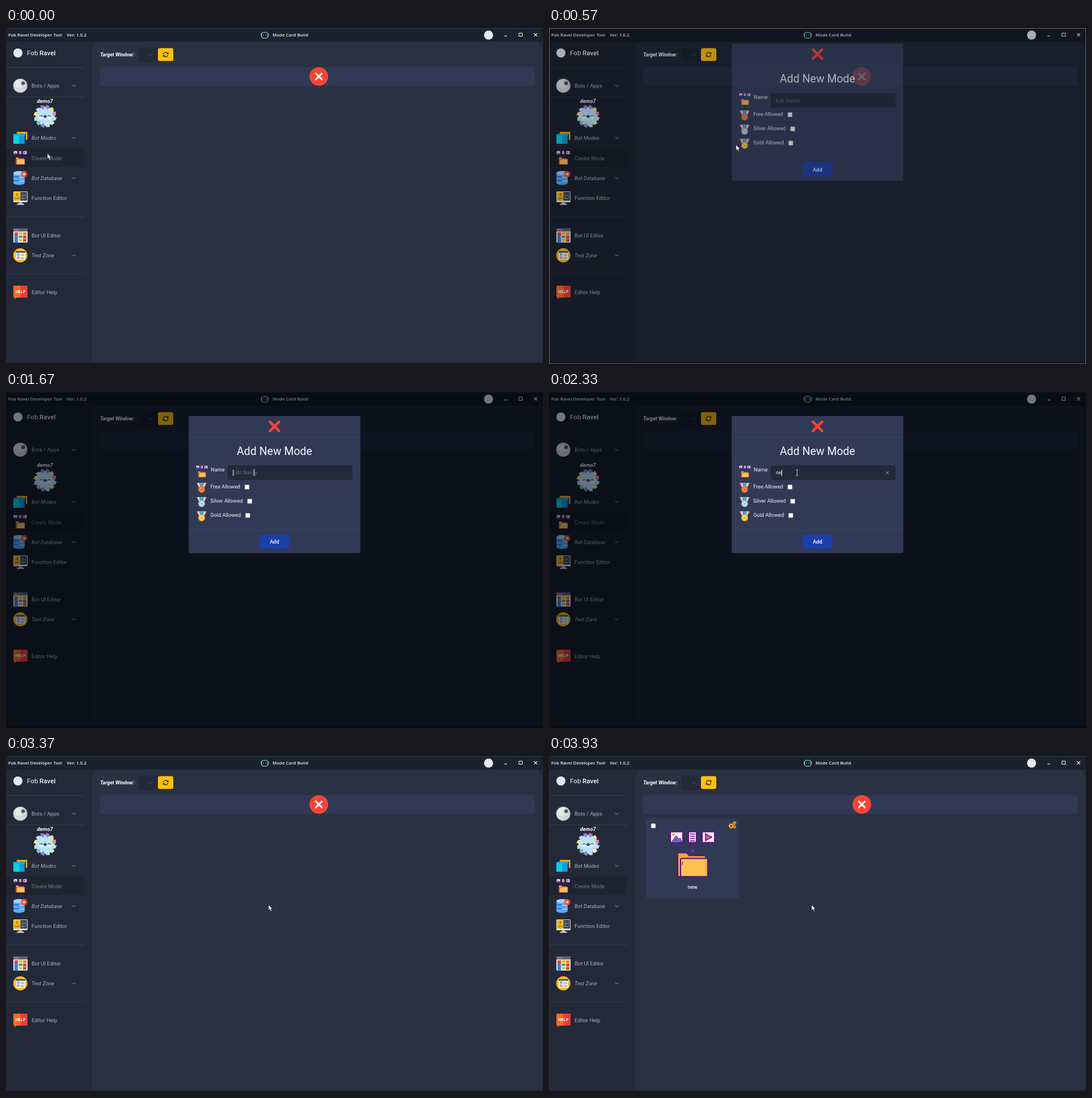
An HTML page with a canvas that plays this animation: 947 px wide and 592 px high, repeating every 4410 ms.

```html
<!DOCTYPE html>
<html lang="en">
<head>
<meta charset="utf-8">
<title>Mode Card Build</title>
<style>
html, body { margin: 0; width: 100%; height: 100%; overflow: hidden; background: #24293a; }
canvas { display: block; width: 947px; height: 592px; }
</style>
</head>
<body>
<canvas id="stage"></canvas>
<script>
const W = 947, H = 592, LOOP = 4410;
const dpr = window.devicePixelRatio || 1;
const stage = document.getElementById('stage');
const spare = document.createElement('canvas');
for (const c of [stage, spare]) { c.width = W * dpr; c.height = H * dpr; }
const main = stage.getContext('2d');
const off = spare.getContext('2d');
let g = main;

const clamp = v => Math.max(0, Math.min(1, v));
const span = (t, a, b) => clamp((t - a) / (b - a));
const easeOut = p => 1 - Math.pow(1 - p, 1.75);

// Shape helpers
function rect(x, y, w, h, fill, r = 0, line, lw = 1) {
  g.beginPath();
  g.roundRect(x, y, w, h, r);
  if (fill) { g.fillStyle = fill; g.fill(); }
  if (line) { g.strokeStyle = line; g.lineWidth = lw; g.stroke(); }
}
function disc(x, y, r, fill, ry = r) {
  g.beginPath();
  g.ellipse(x, y, r, ry, 0, 0, 7);
  g.fillStyle = fill;
  g.fill();
}
function trace(pts, close) {
  g.beginPath();
  for (let i = 0; i < pts.length; i += 2) g.lineTo(pts[i], pts[i + 1]);
  if (close) g.closePath();
}
function poly(pts, fill, line, lw = 1) {
  trace(pts, true);
  g.fillStyle = fill;
  g.fill();
  if (line) { g.strokeStyle = line; g.lineWidth = lw; g.stroke(); }
}
function stroke(pts, color, lw = 1) {
  trace(pts);
  g.strokeStyle = color;
  g.lineWidth = lw;
  g.stroke();
}
function arc(x, y, r, a, b, color, lw = 1) {
  g.beginPath();
  g.arc(x, y, r, a, b);
  g.strokeStyle = color;
  g.lineWidth = lw;
  g.stroke();
}
function cross(x, y, r, color, lw) {
  stroke([x - r, y - r, x + r, y + r], color, lw);
  stroke([x + r, y - r, x - r, y + r], color, lw);
}
function text(s, x, y, color, font = '9.3px', align = 'left', family = 'Roboto') {
  g.font = `${font} ${family}, sans-serif`;
  g.textAlign = align;
  g.textBaseline = 'alphabetic';
  g.fillStyle = color;
  g.fillText(s, x, y);
}
function at(x, y, scale, fn) {
  g.save();
  g.translate(x, y);
  g.scale(scale, scale);
  fn();
  g.restore();
}
// Draws a group with one common opacity
function layer(alpha, dy, fn) {
  if (alpha <= 0) return;
  off.setTransform(1, 0, 0, 1, 0, 0);
  off.clearRect(0, 0, spare.width, spare.height);
  off.setTransform(dpr, 0, 0, dpr, 0, dy * dpr);
  g = off;
  fn();
  g = main;
  g.globalAlpha = alpha;
  g.drawImage(spare, 0, 0, W, H);
  g.globalAlpha = 1;
}
function gear(x, y, r, color, hole) {
  g.save();
  g.translate(x, y);
  for (let i = 0; i < 4; i++) {
    rect(-r, -r * .24, r * 2, r * .48, color);
    g.rotate(Math.PI / 4);
  }
  g.restore();
  disc(x, y, r * .76, color);
  disc(x, y, r * .36, hole);
}
const chevron = (x, y, c = '#a0a7b5') => stroke([x - 3, y - 1.5, x, y + 1.5, x + 3, y - 1.5], c, 1);

// Folder with three files, 80 units wide
function folderIcon() {
  const ink = '#56107e';
  stroke([12, 22, 12, 28, 68, 28, 68, 22], '#4a2671', 1.5);
  stroke([40, 22, 40, 33], '#4a2671', 1.5);
  poly([36.5, 33, 43.5, 33, 40, 38], '#7a2fb5');
  for (const [x, w] of [[1, 22], [33, 14], [57, 22]]) rect(x, 1, w, 19, '#faf0fb', 1, ink, 2);
  poly([3, 20, 11, 8, 16, 14, 18, 12, 22, 20], '#5d6bc0', ink);
  disc(6.5, 6, 2.3, '#f6a33a');
  for (let y = 5; y < 18; y += 4) stroke([35.5, y, 44.5, y], ink, 1.6);
  poly([63, 4.5, 63, 16.5, 74, 10.5], '#f0529c', ink, 1.5);
  poly([14, 80, 14, 38, 30, 38, 34, 43, 63, 43, 63, 80], '#f7a537', ink, 2);
  rect(19, 48, 48, 32, '#ffc250', 2, ink, 2);
  rect(63, 49, 3, 30, '#f7a537');
  stroke([22, 54, 22, 59], ink, 1.4);
}

function avatar() {
  const tips = ['#9a7fd0', '#f5e58a', '#e58a98', '#b5e0f8', '#f5e58a', '#b5e0f8',
    '#9a7fd0', '#7fc3a6', '#b5e0f8', '#f5e58a', '#b5e0f8', '#9a7fd0'];
  at(69, 155.5, 1, () => {
    tips.forEach((c, i) => {
      g.save();
      g.rotate((i + .5) * Math.PI / 6);
      poly([-4.5, -11, -3, -20.5, 3, -19, 4.5, -11], c);
      g.restore();
    });
    const star = [];
    for (let i = 0; i < 24; i++) {
      const r = i % 2 ? 12.5 : 17.5, a = i * Math.PI / 12;
      star.push(r * Math.sin(a), -r * Math.cos(a));
    }
    poly(star, '#b9e2f8');
    for (const x of [-7, 7]) {
      disc(x, 1, 4.3, '#e9f6fd');
      arc(x, 1, 2.3, Math.PI, 2 * Math.PI, '#34455c', 1.2);
    }
    disc(0, .5, 2.8, '#34455c', 2.4);
    disc(0, 5, 2, '#e9f6fd', 1.4);
  });
}

function sideIcons() {
  // sphere
  const ball = g.createRadialGradient(21, 97, 3, 25, 102, 13);
  ball.addColorStop(0, '#e9ebec');
  ball.addColorStop(.8, '#d5d8da');
  ball.addColorStop(1, '#b3b8bc');
  disc(25.2, 101.7, 12.5, ball);
  disc(30, 97.3, 3.9, '#9fa5aa');
  disc(30.4, 97.2, 2.9, '#4e545b');
  arc(25.2, 94, 14, .75, 2.4, '#bdc2c5', .7);
  // stacked cards
  rect(19, 183, 18.5, 14, '#f9a61a');
  rect(21, 186, 14, 11, '#2b3040');
  rect(13, 187, 19.5, 17, '#10b9dd');
  rect(13, 190, 10, 14, '#08d0e2');
  rect(23, 190, 9.5, 14, '#0d9bd2');
  rect(16, 186, 18, 3, '#10a9da');
  at(13, 216.5, .3, folderIcon);
  // database
  rect(13, 255, 20, 18, '#5aa8f2');
  disc(23, 273, 10, '#5aa8f2', 3.5);
  for (const y of [261, 268]) {
    rect(13, y, 10, 2, '#2e77d0');
    rect(23, y + 1, 10, 2, '#94c9fb');
  }
  disc(23, 255.5, 10, '#a4d2fb', 3.5);
  gear(32, 257.5, 5.6, '#ee5a3e', '#f7d5c8');
  // monitor
  rect(13, 288, 25, 19, '#dfe3e8', 1);
  rect(14, 289, 11.5, 15, '#f5b80c');
  rect(25.5, 289, 11.5, 15, '#2d3442');
  text('</>', 19.7, 302, '#5a4200', '700 5.5px', 'center');
  rect(19, 291, 1.5, 5, '#7a5a00');
  for (let i = 0; i < 4; i++) {
    rect(27, 291 + i * 3, 4 + i % 2 * 2, 1.3, ['#e95b4d', '#5ac08a', '#6aa9f0', '#aab2c0'][i]);
    rect(33, 291 + i * 3, 3, 1.3, '#7a8394');
  }
  rect(22.5, 307, 6, 3, '#aeb5be');
  rect(19, 309.5, 13, 2, '#dfe3e8', 1);
  // page layout
  rect(13, 353, 25, 25, '#e9edf2', 1);
  rect(13, 353, 25, 5.5, '#5b6577', 1);
  for (let i = 0; i < 3; i++) disc(16 + i * 2.4, 355.8, .8, '#d8dde5');
  const cells = ['#e6433c', '#f9b21b', '#f28a1c', '#3f83dc', '#35a967', '#e6433c', '#3f83dc', '#f9b21b', '#a4643d'];
  cells.forEach((c, i) => rect(15 + i % 3 * 7.5, 360 + Math.floor(i / 3) * 5.8, 6, [7, 4, 5][i % 3], c));
  // checklist
  disc(25.2, 400.5, 12.5, '#fcb918');
  rect(17, 393, 17, 15.5, '#f3f5f7', 1);
  rect(17, 393, 17, 3, '#4b5568', 1);
  disc(21.5, 399.3, 2.3, '#38b48b');
  stroke([20.4, 399.3, 21.3, 400.2, 23, 398.3], '#fff', .8);
  arc(21.5, 404.8, 1.7, 0, 7, '#e8503f', 1.2);
  for (const y of [398.5, 400.5, 404, 406]) rect(25.5, y, 6.5, 1, '#8d98a8');
  // help bubble
  poly([15, 474, 15, 478, 21, 473], '#fb6a26');
  rect(13, 454, 25, 21, '#fb6a26', 2);
  rect(25.5, 454, 12.5, 21, '#f03c32', [0, 2, 2, 0]);
  text('HELP', 25.5, 467.3, '#fff', '700 7.6px', 'center', '"Noto Sans Mono"');
}

function titleBar() {
  const f = '600 7.9px', fam = '"Open Sans"';
  text('Fob Ravel Developer Tool', 4, 14.8, '#eef1f5', f, 'left', fam);
  text('Ver: 1.0.2', 107, 14.8, '#eef1f5', f, 'left', fam);
  text('Mode Card Build', 470, 14.8, '#eef1f5', f, 'left', fam);
  rect(449, 9, 2.5, 6, '#4b8793', 1);
  rect(461, 9, 2.5, 6, '#4b8793', 1);
  rect(450.5, 7.5, 11.5, 10.5, '#1d2c38', 4, '#a5cdd2', 1.2);
  rect(452, 10, 8.5, 4.6, '#10181f', 2);
  disc(454, 12.2, .9, '#53d0c4');
  disc(458.5, 12.2, .9, '#53d0c4');
  disc(851, 12.5, 8, '#e4e7ee');
  rect(879, 13.5, 4.5, 1.2, '#fff');
  rect(904.5, 9, 6, 5.5, null, 0, '#fff', 1);
  cross(934, 12, 2.8, '#fff', 1.1);
}

function shade(rgb, k) { return `rgb(${rgb.map(v => Math.round(v * k))})`; }

function page(p) {
  const k = 1 - .4 * p;
  rect(0, 0, W, H, shade([36, 41, 58], k));
  rect(0, 0, W, 24, shade([27, 33, 45], k));
  rect(0, 0, W, 1, shade([46, 56, 70], k));
  rect(152, 24.5, 794, 563, shade([41, 49, 67], k), [15, 15, 4, 4]);
  rect(0, 590, W, 2, shade([27, 20, 38], k));
  for (const y of [69, 121, 332, 432.5]) rect(0, y, 138, 1, shade([51, 58, 76], k));
  rect(0, 212, 138, 33, shade([31, 37, 48], k), [0, 2, 2, 0]);
  rect(166, 69, 766.5, 33, shade([48, 58, 84], k), 3);
  rect(234, 34, 33, 26, shade([36, 42, 56], k), 3);

  titleBar();
  disc(21, 44, 8, '#e4e7ee');
  text('Fob', 37, 48, '#f2f4f8', '11.7px');
  text('Ravel', 59, 48, '#f2f4f8', '500 11.7px');

  const soft = '#a9b2c3';
  const items = [['Bots / Apps', 105], ['Bot Modes', 196.8, 1], ['Create Mode', 232.5],
    ['Bot Database', 268, 1], ['Function Editor', 303.3], ['Bot UI Editor', 368.5],
    ['Test Zone', 404, 1], ['Editor Help', 469]];
  items.forEach(([s, y, it], i) =>
    text(s, 45, y, i === 2 ? '#737b89' : soft, (it ? 'italic ' : '') + '9.3px'));
  for (const y of [101.7, 193.5, 264.5, 400.5]) chevron(119.5, y);
  text('demo7', 68.7, 131.8, '#fff', 'italic 700 9.2px', 'center');
  sideIcons();
  avatar();

  text('Target Window:', 166, 50, '#fff', 'italic 700 8.9px');
  chevron(255, 47, '#555d6d');
  rect(268, 35.5, 27, 22.5, '#ffc107', 3);
  arc(281.5, 46.8, 4, Math.PI * 1.05, Math.PI * 1.85, '#222', 1.3);
  arc(281.5, 46.8, 4, Math.PI * .05, Math.PI * .85, '#222', 1.3);
  poly([286.5, 42.3, 286.5, 46, 282.8, 46], '#222');
  poly([276.5, 51.3, 276.5, 47.6, 280.2, 47.6], '#222');
  disc(551.7, 85.3, 16.4, '#f94338');
  g.lineCap = 'round';
  cross(551.7, 85.3, 5.3, '#fff', 3);
  g.lineCap = 'butt';

  if (p > 0) rect(0, 0, W, H, `rgba(0,7,14,${.5 * p})`);
}

function medal(x, y, color, rim) {
  for (const [w, c] of [[9.7, '#e8483f'], [7.4, '#f2f5f8'], [4.8, '#4aa5c4']]) {
    poly([x - w, y - 8.5, x + w, y - 8.5, x + w * .45, y + 1, x - w * .45, y + 1], c);
  }
  disc(x, y + 3, 6, rim);
  disc(x, y + 3, 4.5, color);
  disc(x, y + 3, 1.7, rim);
}

function checkbox(x, y) { rect(x, y, 8, 8, '#fff', 1, '#767676', .6); }

function typed(t) { return t < 1970 ? '' : t < 2330 ? 'n' : t < 2500 ? 'ne' : 'new'; }
function caretAlpha(t) {
  if (t < 1270 || t >= 3200) return 0;
  if (t < 1970) return 1 - span(t, 1630, 1830);
  return 1 - span(t, 3030, 3190);
}

function modal(t, hover) {
  rect(322, 42, 303, 242, '#313a55', 2);
  rect(322.5, 42.5, 302, 241, null, 2, 'rgba(0,0,0,.15)');
  rect(322, 79, 303, 1, '#3b4561');
  rect(322, 242.5, 303, 1, '#3b4561');
  g.lineCap = 'round';
  cross(473.5, 60.7, 8, '#fa4234', 4.6);
  g.lineCap = 'butt';
  text('Add New Mode', 473.5, 111, '#f3f5f9', '19.5px', 'center');

  at(335, 129.5, .26, folderIcon);
  text('Name', 361, 139.5, '#f3f5f9');
  rect(391, 129.5, 220, 25.5, '#232938', 3);
  const s = typed(t);
  text(s || 'Edit Name', 400, 145.4, s ? '#f3f5f9' : '#686f7d', '9.2px');
  const cx = Math.round(400.4 + (s ? g.measureText(s).width : 0));
  const ca = caretAlpha(t);
  if (ca > 0) rect(cx, 137, 1, 11, `rgba(255,255,255,${ca})`);
  if (s && t < 3200) cross(596.5, 142.3, 2.5, '#b4bac6', 1);

  const rows = [['Free Allowed', 421, '#f28a4c', '#d9692f'],
    ['Silver Allowed', 425.8, '#cfe0ee', '#93b4cf'],
    ['Gold Allowed', 422.3, '#fbd667', '#e9b02d']];
  rows.forEach(([label, x, c, rim], i) => {
    const y = 167 + i * 25;
    medal(345, y + 1.8, c, rim);
    text(label, 360.3, y + 3.2, '#f3f5f9', '9.2px');
    checkbox(x, y - 3.5);
  });
  rect(447.5, 251.5, 52, 24.5, hover ? '#1c3a9c' : '#1b3faa', 2.5, '#1d3a98');
  text('Add', 473.5, 267.3, '#fff', '500 9.3px', 'center');
}

function card() {
  rect(171, 110, 164.5, 140.5, '#303a54', 3);
  checkbox(180, 119);
  gear(321.2, 123.3, 4.6, '#f9a11b', '#303a54');
  gear(327, 118.3, 3.2, '#f9a11b', '#303a54');
  gear(327.3, 125, 2.6, '#f9a11b', '#303a54');
  at(213, 132.5, 1, folderIcon);
  text('new', 253, 234.2, '#f3f5f9', '500 9.3px', 'center');
}

// Pointer: time, x, y
const path = [[0, 73, 221], [200, 73, 222], [390, 73, 222], [430, 105, 223], [500, 222, 218], [570, 329, 206],
  [640, 382, 184], [720, 418, 164], [800, 432, 153], [900, 437, 148], [1010, 437, 148],
  [1150, 437, 142], [2500, 437, 142], [2600, 441, 158], [2720, 453, 205], [2840, 465, 250],
  [2920, 468, 264], [3000, 465, 264], [3200, 463, 262], [LOOP, 463, 262]];
function pointerAt(t) {
  const i = path.findIndex(k => k[0] > t);
  const a = path[i - 1], b = path[i], p = span(t, a[0], b[0]);
  return [a[1] + (b[1] - a[1]) * p, a[2] + (b[2] - a[2]) * p];
}
const inside = (x, y, l, tp, r, b) => x >= l && x <= r && y >= tp && y <= b;

function pointer(t, x, y, open, hover) {
  if (open && inside(x, y, 391, 129, 611, 155)) {
    const c = '#d0d4da', cx = Math.floor(x) + .5;
    stroke([cx, y - 5, cx, y + 5], c, 1);
    for (const d of [-5, 5]) stroke([cx - 2, y + d, cx + 2, y + d], c, .8);
    return;
  }
  g.lineJoin = 'round';
  at(x, y, 1, () => {
    if (hover || (t >= 30 && t < 400)) {
      g.translate(-.5, -.7);
      poly([0, 0, 1, -.8, 2.2, 0, 2.2, 4.2, 5.5, 5, 7, 6.2, 7, 9.5, 5.8, 13, 1, 13,
        -2, 8.6, -1.6, 7.2, 0, 8.3], '#fff', '#000', .9);
      stroke([2.2, 8, 2.2, 10.5], '#555', .5);
      stroke([4.2, 8, 4.2, 10.5], '#555', .5);
    } else {
      poly([0, 0, 0, 10, 2.3, 8, 4, 11.8, 5.8, 11, 4.1, 7.3, 7, 7.1], '#fff', '#111', .7);
    }
  });
  g.lineJoin = 'miter';
}

function draw(t) {
  const open = t >= 400 && t < 3370;
  const p = open ? span(t, 410, 730) : 0;
  const [x, y] = pointerAt(t);
  const hover = open && inside(x, y, 447, 251, 500, 277);
  g = main;
  g.setTransform(dpr, 0, 0, dpr, 0, 0);
  page(p);
  if (open) layer(clamp(p * 1.36), -50 * (1 - easeOut(p)), () => modal(t, hover));
  const c = span(t, 3590, 3930);
  layer(easeOut(c), 17 * (1 - easeOut(c)), card);
  if (t >= 400 && t < 1270) {
    g.setLineDash([1, 1]);
    g.strokeStyle = '#b8bcc2';
    g.lineWidth = 1;
    g.strokeRect(.5, .5, W - 1, H - 1);
    g.setLineDash([]);
  }
  pointer(t, x, y, open, hover);
}

const start = performance.now();
function tick() {
  draw((performance.now() - start) % LOOP);
  requestAnimationFrame(tick);
}
tick();
</script>
</body>
</html>
```
